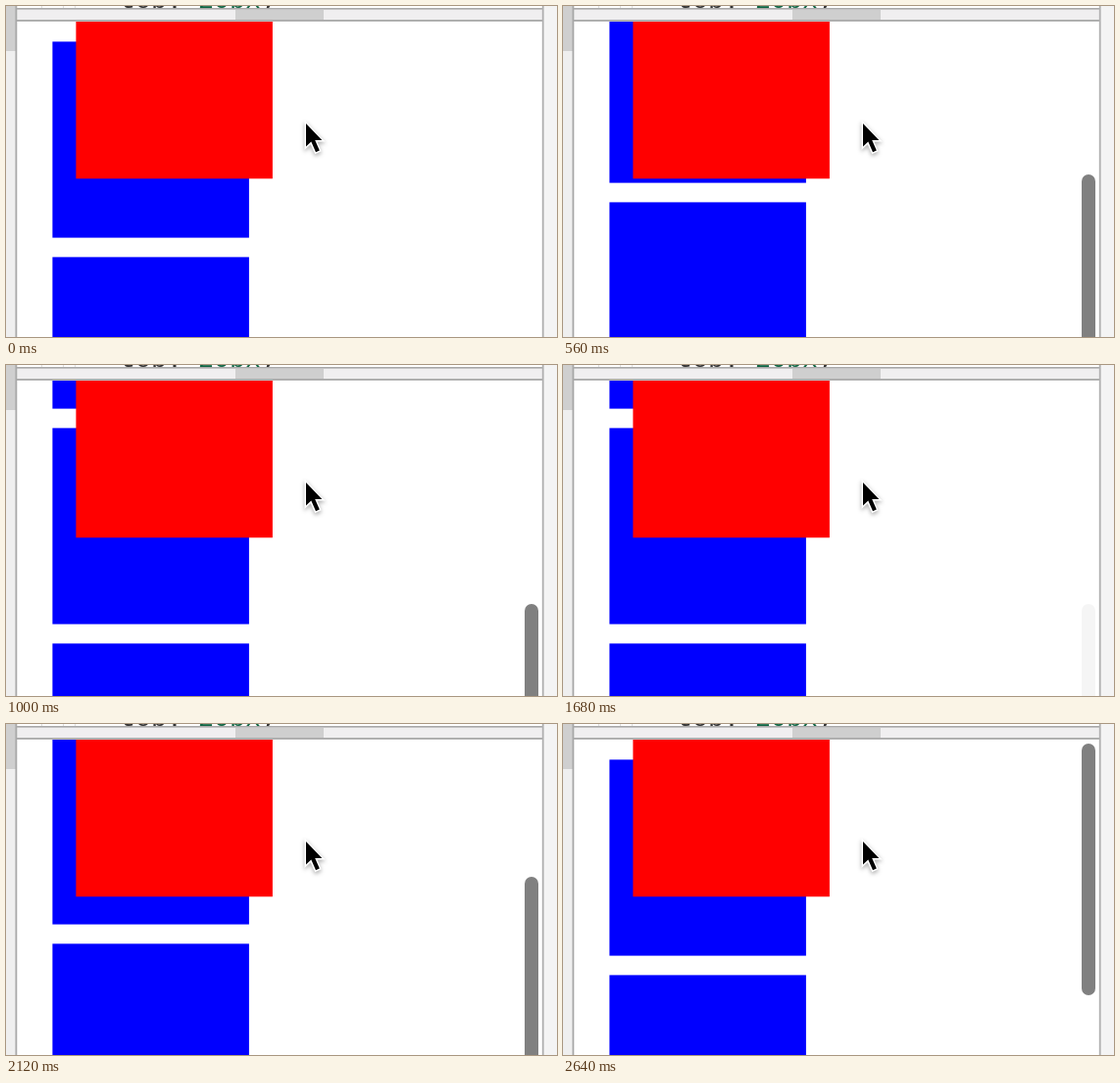
An HTML page with a canvas that plays this animation: 562 px wide and 338 px high, repeating every 3 s.

```html
<!DOCTYPE html>
<html lang="en">
<head>
<meta charset="utf-8">
<title>Scrolling blocks</title>
<style>
  html, body { margin: 0; width: 100%; height: 100%; overflow: hidden; background: #fff; }
  canvas { display: block; }
</style>
</head>
<body>
<canvas id="stage" width="562" height="338"></canvas>
<script>
const ctx = document.getElementById('stage').getContext('2d');
const LOOP = 3000, TICK = 40;
const ZOOM = 4; // one page pixel on the stage

// [time, scroll offset, speed in px per ms]
const scrollKeys = [
  [0, 0, 0.05], [400, 136, 0.86], [720, 376, 0.33], [1000, 412, 0.06],
  [1840, 412, -0.25], [2120, 252, -0.62], [2400, 104, -0.5], [2640, 0, -0.25]
];

const snap = v => Math.round(v / ZOOM) * ZOOM;

function hermite([t0, a, va], [t1, b, vb], t) {
  const d = t1 - t0, u = (t - t0) / d, w = 1 - u;
  return a * (1 + 2 * u) * w * w + b * u * u * (3 - 2 * u)
    + d * u * w * (va * w - vb * u);
}

function scrollAt(t) {
  if (t >= 1000 && t <= 1840) return 412;
  const i = scrollKeys.findIndex(k => k[0] > t);
  return i < 0 ? 0 : snap(hermite(scrollKeys[i - 1], scrollKeys[i], t));
}

function thumbAlpha(t) {
  if (t < 40) return 0;
  if (t <= 1480 || t >= 1880) return 1;
  return 1 - (Math.min(t, 1680) - 1480) / 217;
}

function rect(color, x, y, w, h) {
  ctx.fillStyle = color;
  ctx.fillRect(x, y, w, h);
}

function drawPage(t) {
  const scroll = scrollAt(t);
  ctx.save();
  ctx.beginPath();
  ctx.rect(11, 16, 536, 322);
  ctx.clip();
  for (let y = 36.4 - scroll; y < 338; y += 220) rect('#00f', 47.4, y, 200.5, 200.2);
  rect('#f00', 71.4, 0, 200.5, 176.3);

  ctx.globalAlpha = thumbAlpha(t);
  ctx.fillStyle = '#808080';
  ctx.beginPath();
  ctx.roundRect(529, 20 + snap(scroll / 1.84), 14, 257, 7);
  ctx.fill();
  ctx.restore();
}

function drawCode() {
  ctx.save();
  ctx.beginPath();
  ctx.rect(11, 0, 536, 2.5);
  ctx.clip();
  for (const x of [36, 58, 70]) rect('#ddd', x, 0, 1, 3);
  ctx.font = '26.6px "Liberation Mono", monospace';
  [['top:', 116, '#333'], ['20px', 196, '#164'], [';', 260, '#333']].forEach(([text, x, color]) => {
    ctx.fillStyle = color;
    ctx.fillText(text, x, 2);
  });
  ctx.restore();
}

function drawFrame() {
  rect('#efefef', 0, 0, 10, 338);
  rect('#cfcfcf', 0, 0, 10, 46);
  rect('#f4f4f4', 548, 0, 14, 338);
  rect('#f0eff0', 11, 3, 536, 11);
  rect('#cfcfcf', 234, 4, 90, 10);
  rect('#a8a8a8', 11, 2, 536, 1.6);
  rect('#a8a8a8', 11, 14, 536, 1.8);
  rect('#a8a8a8', 9.5, 0, 1.8, 338);
  rect('#b0b0b0', 546.8, 0, 1.8, 338);
}

function drawCursor() {
  const arrow = new Path2D('M306 120 V143.5 L311.3 138.6 L316 149.3 L319.8 147.6 L315.2 137 H322.3 Z');
  ctx.save();
  ctx.shadowColor = 'rgba(0,0,0,.35)';
  ctx.shadowBlur = 4;
  ctx.shadowOffsetY = 2;
  ctx.strokeStyle = '#fff';
  ctx.lineWidth = 3;
  ctx.stroke(arrow);
  ctx.restore();
  ctx.fillStyle = '#000';
  ctx.fill(arrow);
}

function draw() {
  const t = Math.floor(performance.now() % LOOP / TICK) * TICK;
  rect('#fff', 0, 0, 562, 338);
  drawPage(t);
  drawCode();
  drawFrame();
  drawCursor();
  requestAnimationFrame(draw);
}
draw();
</script>
</body>
</html>
```
